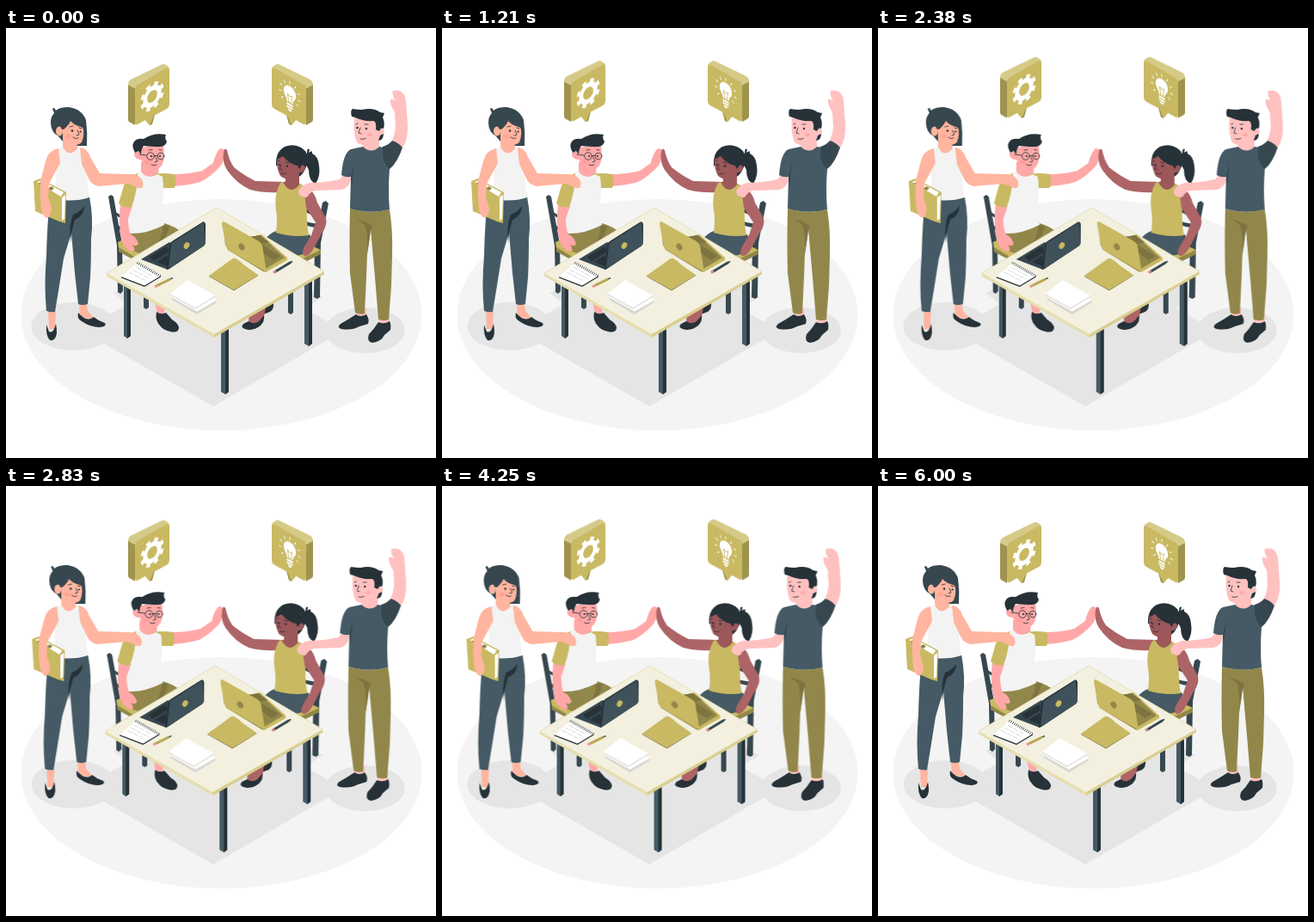
Animation of 500 by 500 pixels, one loop 6040 ms. Source, as an HTML page without scripts:

```html
<!DOCTYPE html>
<html lang="en">
<head>
<meta charset="utf-8">
<title>Team high five</title>
<style>
html, body { margin: 0; width: 100%; height: 100%; overflow: hidden; background: #fff; }
svg { display: block; width: 100vw; height: 100vh; }
.sway { animation: sway 6040ms linear infinite; }
.float { animation: float 6040ms linear infinite; }
/* six seconds of motion, then a short rest */
@keyframes sway {
  0%, 99.338%, 100% { transform: translateX(0); }
  9.934%, 89.404% { transform: translateX(-1px); }
  19.868%, 79.47% { transform: translateX(2px); }
  29.801%, 49.669%, 69.536% { transform: translateX(-4px); }
  39.735%, 59.603% { transform: translateX(4px); }
}
@keyframes float {
  0%, 24.834%, 49.669%, 74.503%, 99.338%, 100% { transform: translateY(0); }
  12.417%, 37.252%, 62.086%, 86.921% { transform: translateY(-10px); }
}
.ink { fill: #263238; }
.slate { fill: #455a64; }
.hair { fill: #37474f; }
.olive { fill: #c9b962; }
.moss { fill: #92874a; }
.dim { fill: #7e7440; }
.cloth { fill: #f3f3f3; }
.peach { fill: #ffb59f; }
.rose { fill: #ffa8a7; }
.pink { fill: #ffc1c0; }
.brown { fill: #ad6466; }
.umber { fill: #9c575a; }
.white { fill: #fff; }
.line { fill: none; stroke: #263238; stroke-width: .8; stroke-linecap: round; }
.icon { fill: none; stroke: #fff; }
.blush { fill: #ff7f78; opacity: .3; }
</style>
</head>
<body>
<svg viewBox="0 0 500 500">
<defs>
  <g id="box">
    <path fill="#a0934e" d="M142 66L150 70V113L143 109Q142 108 142 106Z"/>
    <path fill="#d6ca88" d="M142 66Q142 62 145 60L180 43Q183 41 186 43L189 45Q190 46 190 49L151 71Z"/>
    <path fill="#a0934e" d="M162 107L167 113L170 112L173 101Z"/>
    <path class="olive" d="M150 72Q150 68 153 66L186 47Q190 45 190 50V89Q190 92 187 94L172 102L167 113L162 107L153 112Q150 113 150 110Z"/>
  </g>
</defs>

<!-- floor -->
<ellipse cx="250.500" cy="333.500" rx="233" ry="134.500" fill="#f4f4f4"/>
<g fill="#e5e5e5">
  <path d="M88 352L240 264L392 352L241 440Z"/>
  <path d="M125 308L150 294L202 322L168 342Z"/>
  <path d="M298 321L338 296L369 313L330 336Z"/>
  <ellipse cx="78.500" cy="347" rx="49" ry="28"/>
  <ellipse cx="417.500" cy="351.500" rx="46.500" ry="26.500"/>
</g>

<!-- speech bubbles -->
<g class="float">
  <use href="#box"/>
  <use href="#box" transform="translate(499 0) scale(-1 1)"/>
  <g class="icon" transform="matrix(.87 -.5 0 1 170 79.500)">
    <circle r="9.500" stroke-width="5.500"/>
    <circle r="13.500" stroke-width="4.500" pathLength="16" stroke-dasharray="1 1" transform="rotate(11)"/>
  </g>
  <g transform="matrix(.87 .5 0 1 330 78.500)">
    <path class="white" d="M-4 8Q-4 5 -6 3A8.300 8.300 0 1 1 6 3Q4 5 4 8ZM-4 9.500H4V12H-4ZM-4 13H4V15H-4ZM-3 16H3Q2 18.500 0 18.500Q-2 18.500 -3 16Z"/>
    <path d="M-1.500 8L-3 -1L0 1.500L3 -1L1.500 8" fill="none" stroke="#c9b962" stroke-width=".8"/>
    <path class="icon" d="M-9.500 7A13 13 0 1 1 9.500 7" stroke-width="3.500" pathLength="90" stroke-dasharray="1.600 9.450"/>
  </g>
</g>

<g class="sway">
  <!-- chairs -->
  <g class="hair">
    <path d="M119 196L122 194L125 196L135 251L136 306L133 309L130 307L129 253Z"/>
    <path d="M160 290H166V325L163 327L160 325Z"/>
    <path d="M328 290H334V331L331 333L328 331Z"/>
    <path d="M368 203L372 201L375 204L366 250L365 313L362 315L358 313L359 250Z"/>
    <path d="M123 210Q131 218 141 220V224Q130 221 124 214ZM126 226Q132 232 142 234V238Q132 236 127 230Z"/>
    <path d="M371 212Q360 217 347 209V213Q359 221 371 216ZM369 225Q358 230 347 224V228Q359 235 368 229Z"/>
  </g>
  <path class="olive" d="M130 249L150 240L190 262L160 276L131 256Z"/>
  <path class="moss" d="M131 255L151 267V271L131 260Z"/>
  <path class="olive" d="M302 257L340 246L366 258L337 274Z"/>
  <path class="moss" d="M366 258V263L346 273L338 271Z"/>

  <!-- shins under the table -->
  <path class="rose" d="M173 318H185L184 333L176 332Z"/>
  <path class="ink" d="M175 330Q180 334 186 331L193 339Q201 344 201 349Q200 355 191 353Q182 351 179 346Q173 340 175 330Z"/>
  <path class="ink" d="M297 325L311 318Q312 327 307 330L299 333Z"/>
  <path class="brown" d="M283 326L303 318L300 336L294 346L282 344Z"/>
  <path class="ink" d="M282 341Q290 346 295 340L300 334Q301 341 296 346Q287 353 278 350Q272 348 276 344Z"/>

  <!-- standing woman -->
  <path class="hair" d="M61 126Q52 121 52 110Q52 103 56 99L54 94Q56 91 58 96Q62 92 73 92Q88 94 93 107Q95 122 94 137L79 137L66 132Z"/>
  <path class="peach" d="M66 121V147Q75 155 85 147L81 131Z"/>
  <path class="peach" d="M49 329H58L57 350H50ZM85 321H94L95 329L104 339L86 336Z"/>
  <path class="ink" d="M47 345Q46 358 51 363Q57 365 59 355Q59 348 58 344Q55 356 50 353ZM84 331Q82 338 88 341Q98 348 109 348Q118 347 115 343Q108 341 102 336Q94 343 84 331Z"/>
  <path class="slate" d="M54 198Q80 203 97 196Q102 222 99 245Q99 270 98 290L95 321Q89 323 84 321L80 285L76 238L67 268Q62 300 57 330Q52 331 47 329Q44 300 47 265Q48 225 51 201Z"/>
  <path class="ink" d="M76 238L75 250Q73 228 78 217Q86 214 91 207Q91 218 80 223Z"/>
  <path class="cloth" d="M60 140L66 138Q73 153 85 138L89 140Q96 148 94 160Q93 174 97 197Q80 203 54 199Q60 184 58 168Q56 150 60 140Z"/>
  <path class="peach" d="M65 108L76 104L89 112Q92 124 88 133Q83 138 76 135Q68 133 66 126Z"/>
  <ellipse class="peach" cx="62" cy="120" rx="4" ry="5.500"/>
  <path class="hair" d="M64 117L63 104Q76 95 92 107L91 122Q91 116 87 115Q79 113 75 108Q73 113 67 118Z"/>
  <path class="line" d="M74 115L78 114M85 116L88 117M78 127Q81 130 84 128M83 119L85 124L82 125"/>
  <circle class="ink" cx="77" cy="119.500" r="1.200"/><circle class="ink" cx="86.500" cy="120.500" r="1.100"/>
  <ellipse class="blush" cx="73" cy="126" rx="3" ry="2.300"/>
  <!-- binder -->
  <path class="olive" d="M32 178L40 175L70 191L69 227L62 225L34 213Z"/>
  <path class="white" d="M36 179L41 177L67 191L64 196ZM65 197L69 194L68 222L65 224Z"/>
  <path class="moss" d="M41 178L45 179L42 183L38 181ZM52 184L56 186L53 189L49 187Z"/>
  <path class="peach" d="M61 140Q49 142 46 155L40 178Q39 195 41 211Q43 220 48 221Q53 218 53 209L49 197L50 181L63 157Z"/>

  <!-- seated man -->
  <path class="moss" d="M139 240L184 227Q198 231 206 239L172 268L139 256Z"/>
  <path class="dim" d="M176 250Q184 239 182 229L190 230Q188 241 180 252Z"/>
  <path class="rose" d="M157 156H178L177 172Q166 179 157 170Z"/>
  <path class="rose" d="M195 170Q213 170 228 166L241 157Q243 147 248 141Q252 138 254 143Q254 155 249 161Q238 173 226 179Q212 183 195 184Z"/>
  <path class="olive" d="M172 170Q184 168 196 170Q199 178 196 186L178 186Z"/>
  <path class="cloth" d="M151 168L157 167Q165 177 176 170L182 173Q184 187 182 203L184 229Q163 240 143 239Q142 227 146 205Z"/>
  <path class="rose" d="M133 204L147 207L142 222Q142 233 145 240Q152 243 154 251Q152 255 147 252Q152 259 147 260Q138 258 135 248Q130 228 133 204Z"/>
  <path class="olive" d="M153 169Q141 173 137 183L131 204Q138 210 146 208Q153 190 153 169Z"/>
  <path class="rose" d="M156 139L183 136Q185 150 182 158Q179 165 170 165Q161 163 157 153Q149 153 149 146Q151 141 156 145Z"/>
  <path class="ink" d="M150 145Q146 137 148 134Q150 128 160 129Q172 121 186 124Q184 128 187 132Q186 137 180 138Q168 138 160 137Q157 141 157 147L154 143Z"/>
  <g class="line">
    <circle cx="168" cy="149" r="4.300"/><circle cx="180" cy="149" r="3.800"/>
    <path d="M163 148L155 147M172.500 148.500H176M166 142L170 141.500M178 141.500L181 142M174 150L176 155L173 156M169 159Q172 161 175 159"/>
  </g>
  <circle class="ink" cx="169" cy="149" r="1.100"/><circle class="ink" cx="179" cy="149" r="1"/>
  <ellipse class="blush" cx="164" cy="156" rx="3" ry="2"/>
  <path class="peach" d="M86 139Q95 140 98 150L109 169L143 170Q153 169 158 176Q161 182 158 186Q154 187 150 184L142 181L108 184Q100 183 96 175L88 158Z"/>

  <!-- seated woman -->
  <path class="slate" d="M314 236Q335 243 353 240Q359 250 346 263L325 268L300 247Q306 239 314 236Z"/>
  <path class="ink" d="M350 146Q350 139 353 141L352 145Q357 141 356 146Q363 149 364 160Q366 172 360 181Q352 178 352 165L347 155ZM314 160Q313 144 324 138Q338 133 348 143Q354 152 350 159Q346 171 339 174L326 164Z"/>
  <path class="brown" d="M325 179L290 178Q276 171 265 162Q259 153 257 142Q254 138 253 144Q251 156 257 165Q268 181 284 188Q300 192 318 191Z"/>
  <path class="umber" d="M325 169L341 166V181L348 185L350 203L319 199Q317 184 325 178Z"/>
  <path class="olive" d="M319 180L322 179Q331 196 342 181L347 184Q351 193 350 205Q349 225 352 241Q335 244 314 238Q316 222 314 212Q311 194 319 180Z"/>
  <path class="brown" d="M346 185Q358 187 362 203L372 221Q374 230 367 239L358 256Q352 266 347 265Q343 262 347 254L355 241L360 226L349 209Z"/>
  <path class="umber" d="M315 151Q317 147 322 147Q330 155 340 158L342 160Q348 158 348 163Q346 169 341 168Q339 175 332 176Q325 177 319 172Q314 163 315 151Z"/>
  <path class="ink" d="M315 153Q316 143 327 142Q339 145 345 158L341 164L339 160Q329 158 322 149Z"/>
  <path class="line" d="M316 155L318 154M325 156L329 157M320 159L318 164L321 165M320 169Q323 171 326 169"/>
  <circle class="ink" cx="318" cy="159" r="1.100"/><circle class="ink" cx="327" cy="160.500" r="1.200"/>

  <!-- standing man -->
  <path class="pink" d="M407 325H419V338H407ZM434 335H446V347H434Z"/>
  <path class="ink" d="M407 333Q398 339 389 344Q384 348 390 350Q402 352 411 347L421 344Q423 339 419 333Q412 337 407 333ZM433 342Q428 350 422 356Q419 365 426 366Q436 365 440 357L447 351Q448 344 446 341Q440 345 433 342Z"/>
  <path class="moss" d="M400 210Q424 217 446 211Q450 235 449 265L448 300L445 339Q440 341 433 339L429 290L424 234L420 262L419 290L417 332Q411 334 406 331L400 285Q399 250 400 210Z"/>
  <path class="dim" d="M424 236L420 264Q421 238 417 229L408 222Q419 225 426 230Z"/>
  <path class="pink" d="M448 133Q452 125 453 116L452 98Q446 89 447 83Q451 82 454 87Q448 77 450 73Q463 70 465 84L467 112Q468 130 461 139Z"/>
  <path class="pink" d="M397 165L388 176Q370 180 353 180Q342 183 340 190Q341 196 345 196Q350 199 352 194Q356 189 362 189L390 188Q399 186 401 176Z"/>
  <path class="pink" d="M415 130L434 124V141Q425 149 415 142Z"/>
  <path class="slate" d="M401 141L415 138Q425 147 434 138L446 140V164Q444 190 446 211Q424 217 400 210L401 173Q395 174 390 171Q392 145 401 141Z"/>
  <path class="hair" d="M438 138Q445 136 449 131Q456 133 461 139Q455 157 446 164Q439 158 438 148ZM401 173L405 157L402 184Z"/>
  <path class="pink" d="M405 104L430 107L434 118Q440 115 440 121Q439 127 434 126Q433 134 424 135Q414 138 408 133Q403 121 405 104Z"/>
  <path class="ink" d="M402 103Q400 96 403 94Q408 95 414 95Q427 92 435 98L440 99L438 104Q441 110 439 117Q436 115 434 120L430 118Q431 108 427 108Q416 109 406 104ZM435 125L439 123Q439 130 433 131Z"/>
  <path class="line" d="M407 112L409 111M417 112L421 112M412 116L410 122L413 123M412 129Q415 130 418 128.500"/>
  <circle class="ink" cx="408.500" cy="116" r="1.200"/><circle class="ink" cx="419" cy="117" r="1.200"/>
  <ellipse class="blush" cx="423" cy="124" rx="3" ry="2"/>

  <!-- table -->
  <g class="slate">
    <path d="M137 292H145V358L141 361L137 358Z"/>
    <path d="M347 292H356V367L352 370L347 367Z"/>
    <path d="M250 345H259V423L255 426L250 423Z"/>
  </g>
  <path class="ink" d="M141 292H145V358L141 361ZM352 292H356V367L352 370ZM255 345H259V423L255 426Z"/>
  <path fill="#e6deae" d="M117 284.500L242 355V360L117 288.500Z"/>
  <path fill="#d9ce8e" d="M370 282.500V286.500L242 360V355Z"/>
  <path fill="#f3f0df" d="M245 209L370 283L242 356L117 285Z"/>
  <path d="M117 285L245 209L370 283" fill="none" stroke="#e3dba9" stroke-width=".8"/>

  <!-- laptops -->
  <path class="hair" d="M157 269L190 249L211 262L188 281Z"/>
  <path class="ink" d="M167 266L187 254L190 260L172 271ZM175 272L188 264V277Z"/>
  <path class="ink" d="M187 281L190 253Q190 250 193 248L228 226Q231 224 232 228L232 248Q232 252 229 254L190 280Z"/>
  <path fill="#3f525b" d="M189 280L192 253Q192 250 195 248.500L230 226L232 248Q232 252 229 254Z"/>
  <ellipse class="olive" cx="210" cy="253" rx="3" ry="4" transform="rotate(32 210 253)"/>
  <path class="olive" d="M282 244L297 240L327 267V270L302 284Z"/>
  <path class="moss" d="M283 243L296 241L324 267L302 280Z"/>
  <path class="dim" d="M298 252L319 265L311 270L299 262ZM283 243L295 241L306 249L298 251Z"/>
  <path class="moss" d="M252 225L254 226L302 284L299 283L258 258L255 252Z"/>
  <path class="olive" d="M251 228Q251 224 255 226L294 248Q297 250 298 253L303 284L260 259Q257 257 256 254Z"/>
  <ellipse class="moss" cx="274" cy="254.500" rx="3.200" ry="4.300" transform="rotate(-35 274 254.500)"/>

  <!-- desk items -->
  <path class="moss" d="M236 288L265 304L293 287V288L265 305.500L236 289Z"/>
  <path class="olive" d="M236 288L261 270Q264 267 267 268L273 272L276 275L293 287L265 304Z"/>
  <path fill="#d5d5d5" d="M193 314L222 330L245 317V319L222 333L193 316Z"/>
  <path class="white" d="M193 313L214 298L245 316L222 329Z"/>
  <path fill="#e3e3e3" d="M191 309L220 325L243 311V313L220 327L191 311Z"/>
  <path class="white" d="M191 309L211 293L243 311L220 325Z"/>
  <path class="ink" d="M134 289L161 299L180 288V289.500L161 301L134 290.500Z"/>
  <path class="white" d="M134 289L153 273L180 288L161 299.500Z"/>
  <path d="M152.500 273L179.500 288.500" stroke="#263238" stroke-width="3" pathLength="30" stroke-dasharray=".7 1.550"/>
  <path d="M143 284L163 294M147 281L168 292M151 278L171 289" fill="none" stroke="#b9bfc1" stroke-width=".6" stroke-dasharray="6 1.500"/>
  <g fill="none" stroke-width="3">
    <path d="M173 301L176 299.300" stroke="#f08f8f"/>
    <path d="M176 299.300L191 292" stroke="#b7a650"/>
    <path d="M191 292L194 290.500" stroke="#455a64" stroke-width="1.500"/>
    <path d="M312 284L331 272.500" stroke="#37474f"/>
    <path d="M311 284.500L314 282.800" stroke="#d98787"/>
    <path d="M331 272.500L333 271.300" stroke="#263238" stroke-width="1.500"/>
  </g>
</g>
</svg>
</body>
</html>
```
